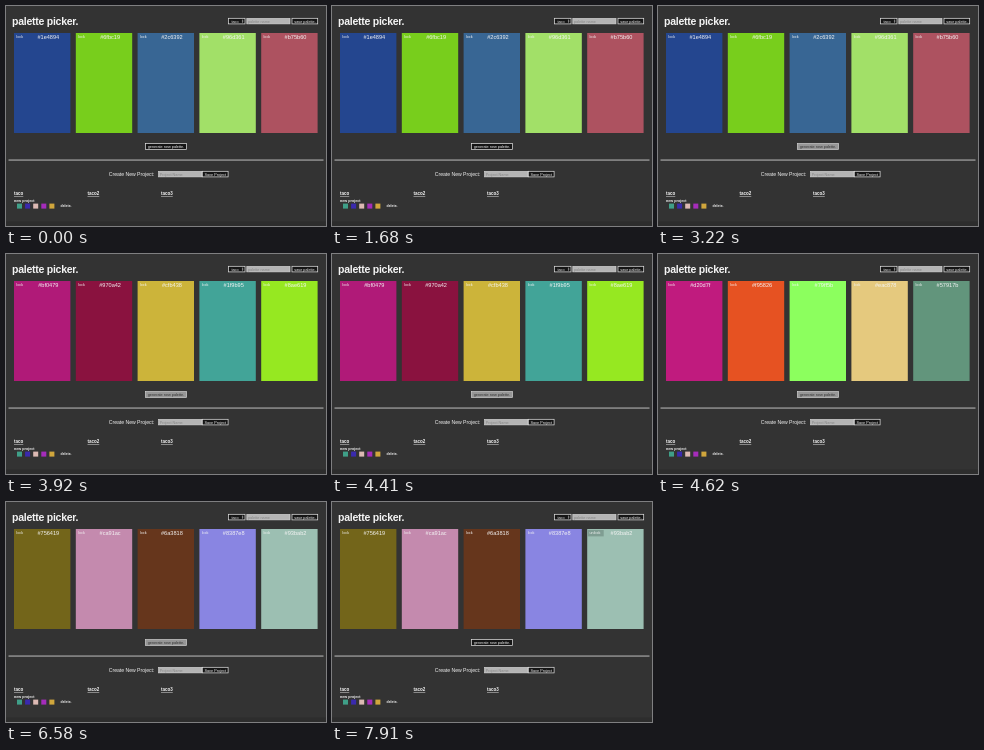
Animation, 320 px wide and 220 px high, one loop 8 s. Source, as an HTML page:

```html
<!DOCTYPE html>
<html lang="en">
<head>
<meta charset="utf-8">
<title>palette picker</title>
<style>
  html, body { margin: 0; width: 100%; height: 100%; overflow: hidden; background: #333; }
  svg { display: block; width: 320px; height: 220px; font-family: "Liberation Sans", Arial, sans-serif; }
  text { fill: #f4f4f4; }
  .small { font-size: 3.8px; }
  .bold { font-weight: bold; }
  .link { font-size: 4.5px; font-weight: bold; text-decoration: underline; }
  .hex { font-size: 5.6px; text-anchor: middle; }
  .button rect { fill: #151515; stroke: #e4e4e4; stroke-width: .7; }
  .button text { text-anchor: middle; }
  .field rect { fill: #b4b4b4; stroke: #d6d6d6; stroke-width: .6; }
  .field text { fill: #858585; }
  .hover rect { fill: #969696; stroke: #d2d2d2; }
  .hover text { fill: #303030; }
</style>
</head>
<body>
<svg viewBox="0 0 320 220">
  <rect width="320" height="220" fill="#333"/>
  <rect y="215.5" width="320" height="4.5" fill="#2d2d2d"/>
  <text class="bold" x="6" y="18.5" font-size="10.5" letter-spacing="-.25">palette picker.</text>

  <g class="button small">
    <rect x="222.5" y="12.3" width="16.5" height="5.6"/>
    <text x="229" y="16.5">taco</text>
    <path d="M235.8 14.6l.8-1.2.8 1.2zM235.8 15.6l.8 1.2.8-1.2z" fill="#eee"/>
  </g>
  <g class="field small">
    <rect x="240.8" y="12.3" width="43.2" height="5.6"/>
    <text x="242" y="16.5">palette name</text>
  </g>
  <g class="button small">
    <rect x="286" y="12.3" width="25.7" height="5.6"/>
    <text x="299" y="16.5">save palette.</text>
  </g>

  <g id="cards"></g>

  <g id="generate" class="button small">
    <rect x="139.5" y="137.6" width="41" height="5.8"/>
    <text x="160" y="141.9">generate new palette.</text>
  </g>
  <rect x="2.5" y="153.6" width="315" height=".9" fill="#ccc"/>

  <text x="102.8" y="170" font-size="5.1">Create New Project:</text>
  <g class="field small">
    <rect x="152.5" y="165.3" width="43.5" height="5.6"/>
    <text x="153.7" y="169.6">Project Name</text>
  </g>
  <g class="button small">
    <rect x="196.3" y="165.3" width="25.8" height="5.6"/>
    <text x="209.2" y="169.6">Save Project</text>
  </g>

  <text class="link" x="8" y="189">taco</text>
  <text class="link" x="81.5" y="189">taco2</text>
  <text class="link" x="155" y="189">taco3</text>
  <text class="bold" x="8" y="195.8" font-size="3.7">new project</text>
  <g id="swatches"></g>
  <text class="bold" x="54.5" y="201.3" font-size="3.5">delete.</text>
</svg>
<script>
  const LOOP = 8000;
  const HOVER = [2940, 7140];
  const LOCK_HOVER = 7630;
  const LOCK_CLICK = 7910;

  // Each entry holds a label and its on-screen fill.
  const palettes = [
    { start: 0, colors: ['#1e4894 #24468f', '#6fbc19 #78ce1c', '#2c6392 #386694', '#96d361 #a2e068', '#b75b60 #ad5260'] },
    { start: 3710, colors: ['#bf0479 #b01a78', '#970a42 #8a123f', '#cfb438 #ccb43a', '#1f9b95 #42a498', '#8ae619 #96e821'] },
    { start: 4620, colors: ['#d20d7f #c01b7e', '#f95826 #e65222', '#79ff5b #8cff5e', '#eac878 #e5c97e', '#57917b #62957c'] },
    { start: 5040, colors: ['#756419 #73651a', '#ca91ac #c48aae', '#6a3818 #66361c', '#8387e8 #8985e2', '#93bab2 #9cbfb2'] }
  ];

  function add(parent, tag, attrs, content = '') {
    const node = document.createElementNS('http://www.w3.org/2000/svg', tag);
    for (const key in attrs) node.setAttribute(key, attrs[key]);
    node.textContent = content;
    return parent.appendChild(node);
  }

  const byId = id => document.getElementById(id);

  const cards = Array.from({ length: 5 }, (_, i) => {
    const group = add(byId('cards'), 'g', { transform: `translate(${8 + i * 61.8} 27)` });
    return {
      panel: add(group, 'rect', { width: 56.4, height: 100 }),
      lockBox: add(group, 'rect', { x: .5, y: 1, width: 16, height: 6.4, fill: '#7f9d92', opacity: 0 }),
      lock: add(group, 'text', { class: 'small', x: 2.3, y: 5.2 }, 'lock'),
      hex: add(group, 'text', { class: 'hex', x: 34.3, y: 5.6 })
    };
  });

  ['#3f9f88', '#3a2aae', '#dcb9b3', '#a52cba', '#d0a63c'].forEach((fill, i) =>
    add(byId('swatches'), 'rect', { x: 11 + i * 8.1, y: 197.6, width: 5, height: 5, fill }));

  let shown;

  function showPalette(palette) {
    if (palette === shown) return;
    shown = palette;
    palette.colors.forEach((color, i) => {
      const [label, fill] = color.split(' ');
      cards[i].panel.setAttribute('fill', fill);
      cards[i].hex.textContent = label;
    });
  }

  function draw(now) {
    const t = now % LOOP;
    showPalette(palettes.filter(p => p.start <= t).pop());
    byId('generate').classList.toggle('hover', t >= HOVER[0] && t < HOVER[1]);
    const last = cards[4];
    last.lockBox.setAttribute('opacity', t >= LOCK_HOVER ? 1 : 0);
    last.lock.textContent = t >= LOCK_CLICK ? 'unlock' : 'lock';
  }

  const origin = performance.now();
  function tick() {
    draw(performance.now() - origin);
    requestAnimationFrame(tick);
  }
  tick();
</script>
</body>
</html>
```
